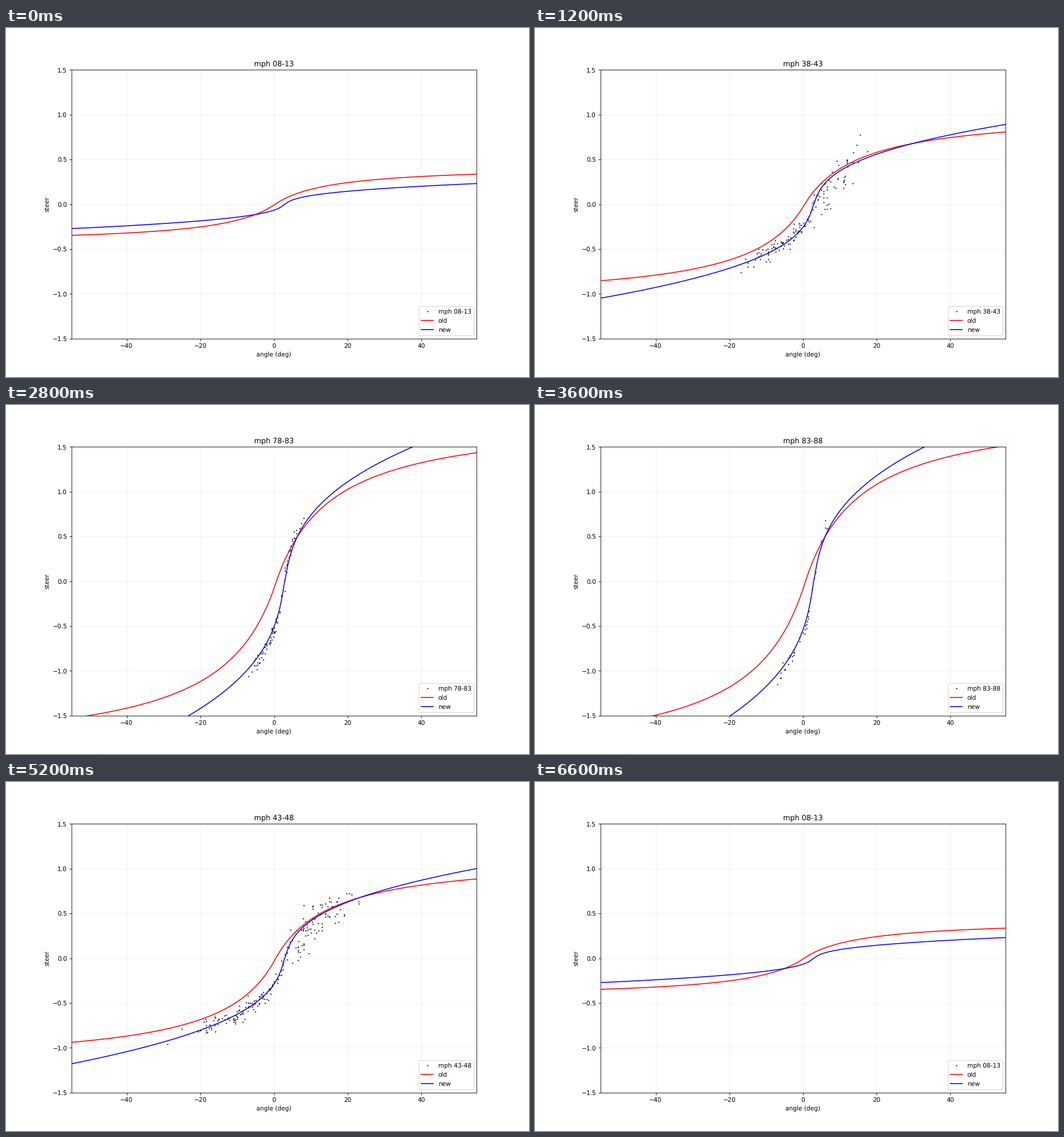
Animation of 917 by 611 pixels, one loop 6800 ms. Source, as a matplotlib script:

```python
import numpy as np
import matplotlib.pyplot as plt
from matplotlib.animation import FuncAnimation

WIDTH, HEIGHT, DPI = 917, 611, 76.4
STEPS, INTERVAL = 34, 200
FIRST_BIN, BIN_WIDTH = 8, 5
X_MAX, Y_MAX = 55, 1.5
ANGLES = np.linspace(-X_MAX, X_MAX, 1101)

# Unhinted text keeps label and legend sizes in proportion at this low dpi
plt.rcParams["text.hinting"] = "none"


def bell(x, center, width):
    return np.exp(-((x - center) / width) ** 2)


def old_steer(angle, speed):
    """Saturating curve whose value at both ends grows linearly with speed."""
    center = 0.25 + 0.005 * speed

    def sigmoid(a):
        x = 0.065 * (a - center)
        return x / (1 + np.abs(x))

    right = (0.171 + 0.0157 * speed) / sigmoid(X_MAX)
    left = -(0.170 + 0.0169 * speed) / sigmoid(-X_MAX)
    return np.where(angle > center, right, left) * sigmoid(angle)


def new_steer(angle, speed):
    """Power curve, smoothed around its zero and proportional to speed."""
    offset = angle - 2.9
    reach = np.abs(offset)
    shape = reach ** 0.39 * offset / (reach + 0.85)
    return np.where(offset > 0, 0.004786, 0.005397) * speed * shape


def cloud(low):
    """Noisy measurements around the new curve: angles and steer values."""
    speed = low + BIN_WIDTH / 2
    rng = np.random.default_rng(low)
    n = int(320 * bell(speed, 58, 19))

    # Turns get tighter at high speed; a few points stray further out
    reach = 7 + 15 * bell(speed, 50, 17)
    x = reach * (2 * rng.beta(1.5, 1.5, n) - 1)
    x *= np.where(rng.random(n) < 0.04, 1.4, 1)
    x = np.round(2 * x) / 2 + rng.normal(0, 0.06, n)

    # Right turns are noisier and fall short at low speed
    right_bias = np.clip(0.006 * (speed - 65), -0.12, 0.06)
    left_bias = -0.003 * max(speed - 62, 0)
    bias = right_bias * bell(x, 7, 4) + left_bias * (x < 2)
    right_spread = 0.05 + 0.003 * max(65 - speed, 0)
    spread = np.interp(x, [2, 5], [0.05, right_spread])
    return x, new_steer(x, speed) + bias + spread * rng.normal(size=n)


# The tiny margin keeps the pixel size from rounding down
fig, ax = plt.subplots(
    figsize=((WIDTH + 1e-6) / DPI, (HEIGHT + 1e-6) / DPI), dpi=DPI)
dots, = ax.plot([], [], "ko", markersize=1, label="mph 08-13")
old_line, = ax.plot([], [], color="red", label="old")
new_line, = ax.plot([], [], color="blue", label="new")
ax.set_xlim(-X_MAX, X_MAX)
ax.set_ylim(-Y_MAX, Y_MAX)
ax.set_xlabel("angle (deg)")
ax.set_ylabel("steer")
ax.grid(alpha=0.2)
title = ax.set_title("mph 08-13")
legend = ax.legend(loc="lower right")


def update(i):
    # The speed bins climb to the top one and come back down
    low = FIRST_BIN + BIN_WIDTH * min(i, STEPS - 1 - i)
    speed = low + BIN_WIDTH / 2
    label = f"mph {low:02d}-{low + BIN_WIDTH:02d}"
    title.set_text(label)
    legend.get_texts()[0].set_text(label)
    dots.set_data(*cloud(low))
    old_line.set_data(ANGLES, old_steer(ANGLES, speed))
    new_line.set_data(ANGLES, new_steer(ANGLES, speed))
    return dots, old_line, new_line, title


anim = FuncAnimation(fig, update, frames=STEPS, interval=INTERVAL,
                     repeat=True, repeat_delay=0, blit=False)
plt.show()
```
